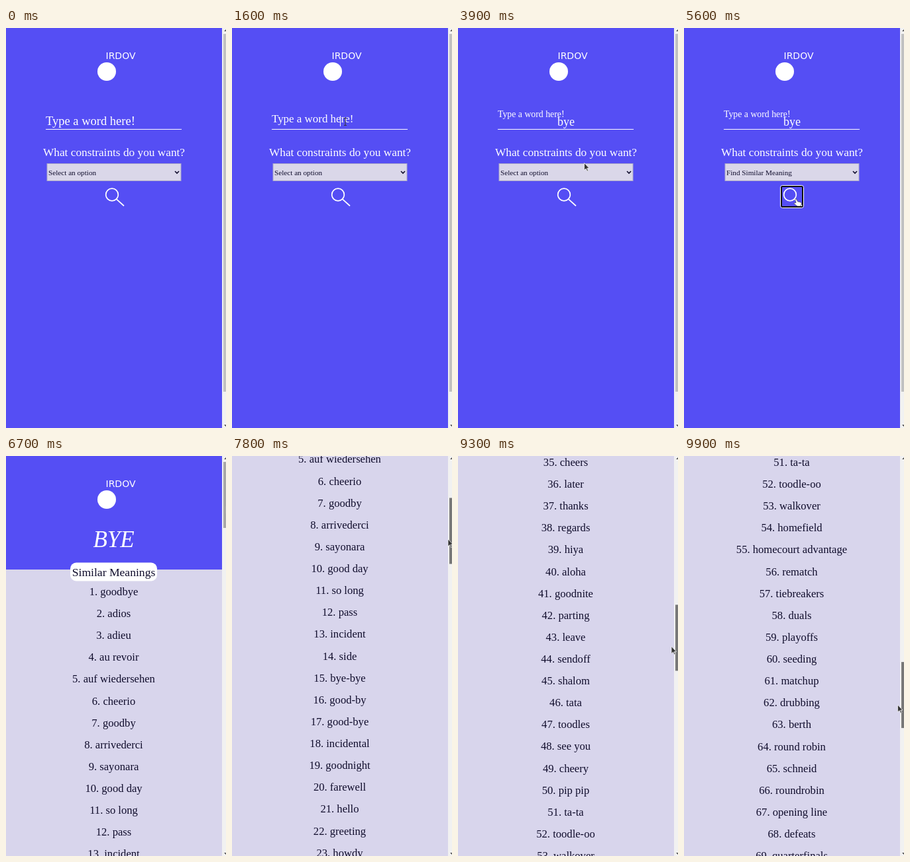
An HTML page for the animation above (10 s loop, 332 px wide and 606 px high).

```html
<!DOCTYPE html>
<html lang="en">
<head>
<meta charset="utf-8">
<title>Word search</title>
<style>
html, body { margin: 0; height: 100%; overflow: hidden; background: #554ef4; }
svg { display: block; width: 100%; height: 100%; font-family: "Liberation Serif", serif; fill: #fff; }
.mid { text-anchor: middle; }
.dark { fill: #100d2c; }
.line { fill: none; stroke: #fff; }
.brand { font: 14px "DejaVu Sans", sans-serif; }
</style>
</head>
<body>
<svg viewBox="0 0 332 606">
  <defs>
    <g id="logo">
      <circle cx="152" cy="66" r="14"/>
      <text class="brand" x="150.5" y="47">IRDOV</text>
    </g>
  </defs>
  <rect width="332" height="606" fill="#554ef4"/>

  <g id="form">
    <use href="#logo"/>
    <text id="label" x="60">Type a word here!</text>
    <path class="line" d="M60 153.5H265"/>
    <text id="word" class="mid" x="163" y="148" font-size="18"></text>
    <path id="caret" class="line" d="M0 133V149"/>
    <text class="mid" x="163" y="194" font-size="17.3">What constraints do you want?</text>
    <rect x="62" y="205.5" width="202" height="26" fill="#dad7e9" stroke="#aaa7c8"/>
    <text id="option" class="dark" x="64" y="223" font-size="11.2"></text>
    <path d="M255 217l3 3 3-3" fill="none" stroke="#100d2c" stroke-width="1.6"/>
    <g id="ring" fill="none">
      <rect x="145.5" y="238.5" width="35" height="34" rx="3" stroke="#fff"/>
      <rect x="147" y="240" width="32" height="31" rx="2" stroke="#111" stroke-width="2"/>
    </g>
    <g class="line" stroke-width="1.7">
      <circle cx="160" cy="252.5" r="9.3"/>
      <path d="M166.8 259.3L178 269.5"/>
    </g>
  </g>

  <g id="results">
    <rect id="sheet" y="172" width="327" fill="#d8d5ec"/>
    <use href="#logo"/>
    <text class="mid" x="162.5" y="138" font-size="35" font-style="italic">BYE</text>
    <rect x="97" y="161.5" width="131" height="28" rx="9"/>
    <text class="mid dark" x="162.5" y="182" font-size="17.6">Similar Meanings</text>
    <g id="list" class="mid dark" font-size="16.6"></g>
  </g>

  <rect x="326" width="6" height="606" fill="#f1f1f1"/>
  <rect id="thumb" x="328" width="4"/>
  <path d="M329 5l3-3v3zM329 601h3v3z" fill="#555"/>

  <g id="cursor">
    <path id="arrow" d="M0 0V11L2.6 8.6 4.4 12.6 6 11.9 4.3 8H7.5Z" fill="#333" stroke="#fff" stroke-width=".7"/>
    <path id="beam" d="M-2-5.5H2M0-5.5V5.5M-2 5.5H2" fill="none" stroke="#333"/>
    <path id="hand" d="M0 1Q0-1 1.5 0L3.5 4 8 5Q10 6 9 8L8 11H3L-2 7Q-2 5 1 6Z" stroke="#333" stroke-width=".6"/>
  </g>
</svg>
<script>
const $ = id => document.getElementById(id);
const show = (id, on) => $(id).setAttribute("visibility", on ? "visible" : "hidden");
const set = (id, attrs) => { for (const k in attrs) $(id).setAttribute(k, attrs[k]); };

const words = `goodbye,adios,adieu,au revoir,auf wiedersehen,cheerio,goodby,arrivederci,sayonara,
good day,so long,pass,incident,side,bye-bye,good-by,good-bye,incidental,goodnight,farewell,hello,
greeting,howdy,ciao,welcome,hallo,laters,okay,revoir,greetings,hola,salute,hey,bummer,cheers,later,
thanks,regards,hiya,aloha,goodnite,parting,leave,sendoff,shalom,tata,toodles,see you,cheery,pip pip,
ta-ta,toodle-oo,walkover,homefield,homecourt advantage,rematch,tiebreakers,duals,playoffs,seeding,
matchup,drubbing,berth,round robin,schneid,roundrobin,opening line,defeats,quarterfinals,semifinals`
  .split(",").map(w => w.trim());
$("list").innerHTML = words.map((w, i) =>
  `<text x="162.5" y="${211 + i * 33.12}">${i + 1}. ${w}</text>`).join("");

// Linear interpolation through [time, value] points
function at(t, keys) {
  if (t <= keys[0][0]) return keys[0][1];
  for (let i = 1; i < keys.length; i++) {
    const [t0, a] = keys[i - 1], [t1, b] = keys[i];
    if (t <= t1) return a + (b - a) * (t - t0) / (t1 - t0);
  }
  return keys[keys.length - 1][1];
}

const path = [[600, 298, 258], [1100, 171, 142], [3300, 171, 142], [3800, 190, 190],
  [4000, 191, 219], [4900, 191, 219], [5500, 168, 259], [5900, 168, 259], [6600, 333, 76],
  [7100, 330, 76], [7800, 326, 126], [8600, 321.5, 185], [9900, 322.5, 377]];
const pathX = path.map(([t, x]) => [t, x]), pathY = path.map(([t, , y]) => [t, y]);
const scrollKeys = [[7100, 0], [7800, 333], [8600, 704], [9900, 1852]];

function draw(t) {
  const done = t >= 6000;
  show("form", !done);
  show("results", done);

  const lift = at(t, [[1500, 0], [1800, 1]]);
  set("label", { y: 147 - 12.5 * lift, "font-size": 18.5 - 4.7 * lift });
  const typed = t < 2800 ? 0 : t < 3000 ? 1 : t < 3200 ? 2 : 3;
  $("word").textContent = "bye".slice(0, typed);
  set("caret", { transform: `translate(${[163.5, 167.5, 172.5, 176.5][typed]} 0)` });
  show("caret", t >= 1600 && t < 2200 || t >= 2800 && t < 3800);
  $("option").textContent = t < 4500 ? "Select an option" : "Find Similar Meaning";
  show("ring", !done && t >= 5500);

  const scroll = at(t, scrollKeys);
  set("results", { transform: `translate(0 ${-scroll})` });
  set("sheet", { height: 440 + scroll });
  set("thumb", {
    y: 9 + scroll / 6.11,
    height: done ? 100 : 542,
    fill: t >= 7200 ? "#787878" : done ? "#a8a8a8" : "#c1c1c1"
  });

  set("cursor", { transform: `translate(${at(t, pathX)} ${at(t, pathY)})` });
  const beam = t >= 1100 && t < 3500, hand = t >= 5400 && t < 6000;
  show("beam", beam);
  show("hand", hand);
  show("arrow", t >= 600 && !beam && !hand);
}

const start = performance.now();
function tick() {
  const t = (performance.now() - start) % 10000;
  draw(Math.floor(t / 100) * 100);
  requestAnimationFrame(tick);
}
tick();
</script>
</body>
</html>
```
